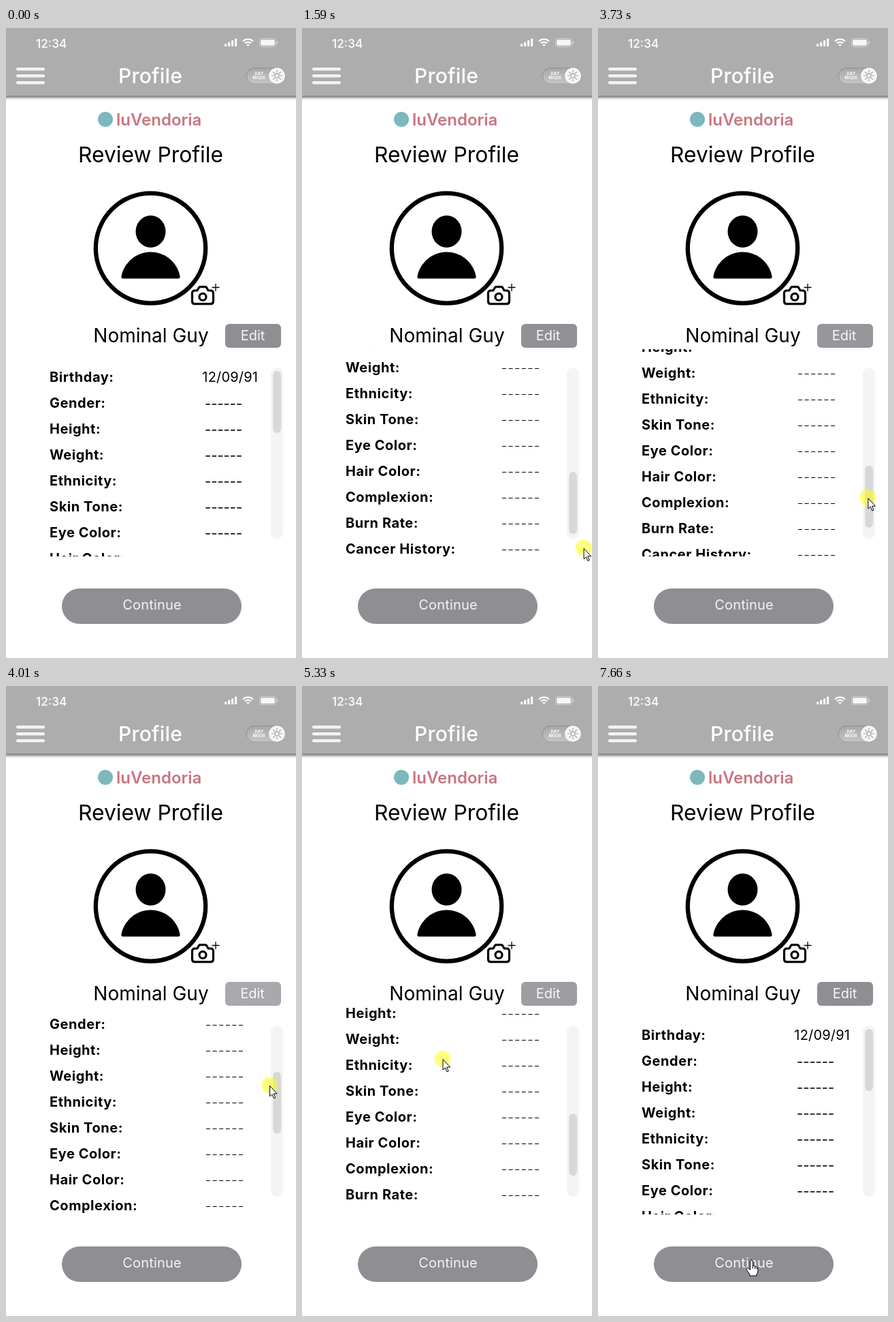
Write an HTML page with a canvas that moves like this. It is 426 px wide and 924 px high and loops after 7.73 s.

```html
<!DOCTYPE html>
<html lang="en">
<head>
<meta charset="utf-8">
<title>Profile review</title>
<style>
html, body { margin: 0; width: 100%; height: 100%; overflow: hidden; background: #fff; }
canvas { display: block; width: 426px; height: 924px; }
</style>
</head>
<body>
<canvas id="stage"></canvas>
<script>
const W = 426, H = 924, LOOP = 7730, TICK = 70;
const canvas = document.getElementById("stage");
const ratio = window.devicePixelRatio || 1;
canvas.width = W * ratio;
canvas.height = H * ratio;
const ctx = canvas.getContext("2d");

const LABELS = ["Birthday", "Gender", "Height", "Weight", "Ethnicity", "Skin Tone",
  "Eye Color", "Hair Color", "Complexion", "Burn Rate", "Cancer History"];
const ROW = 38, SCROLL = 131, THUMB_TRAVEL = 151;
const GRAY = "#8e8e93";

// Each move eases the pointer from where it rests to a new point
const HOME = { x: 440, y: 590 };
const MOVES = [
  { start: 280, end: 830, x: 400, y: 562 },
  { start: 960, end: 1660, x: 414, y: 768 },
  { start: 1660, end: 1870, x: 428, y: 788 },
  { start: 2070, end: 2490, x: 270, y: 735 },
  { start: 2490, end: 2840, x: 424, y: 684 },
  { start: 2910, end: 3450, x: 398, y: 706 },
  { start: 3590, end: 4360, x: 379, y: 496 },
  { start: 4360, end: 4780, x: 205, y: 696 },
  { start: 4910, end: 5500, x: 207, y: 512 },
  { start: 5870, end: 6475, x: 227, y: 748 },
  { start: 6820, end: 7590, x: 225.5, y: 842 }
];
// While held, the pointer's distance from the grab point scrolls the list
const DRAGS = [
  { start: 960, end: 1660, grab: 562, span: 205, base: 0 },
  { start: 3590, end: 4360, grab: 706, span: 205, base: 1 },
  { start: 4910, end: 6820, grab: 696, span: -181, base: 0 }
];
const PRESS_LEAD = 140;

const clamp = v => Math.max(0, Math.min(1, v));
const ease = k => 0.5 - 0.5 * Math.cos(Math.PI * k);
const lastStarted = (list, t) => list.findLast(item => item.start <= t);

function snap(t) {
  const move = lastStarted(MOVES, t);
  return move ? move.start + Math.floor((t - move.start) / TICK) * TICK : 0;
}

function pointerAt(t) {
  const move = lastStarted(MOVES, t);
  if (!move) return HOME;
  const from = MOVES[MOVES.indexOf(move) - 1] || HOME;
  const k = ease(clamp((t - move.start) / (move.end - move.start)));
  return { x: from.x + (move.x - from.x) * k, y: from.y + (move.y - from.y) * k };
}

function scrollAt(t) {
  const drag = lastStarted(DRAGS, t);
  if (!drag) return 0;
  // At the very end the next move begins from the same point
  const y = pointerAt(Math.min(t, drag.end)).y;
  return clamp(drag.base + (y - drag.grab) / drag.span);
}

const dragging = (t, lead = 0) => DRAGS.some(d => t >= d.start - lead && t < d.end);

function text(str, x, y, size, weight = 400, color = "#000", align = "left", spacing = 0) {
  ctx.font = `${weight} ${size}px Inter, sans-serif`;
  ctx.letterSpacing = spacing + "px";
  ctx.textAlign = align;
  ctx.fillStyle = color;
  ctx.fillText(str, x, y);
}

function pill(x, y, w, h, r, color) {
  ctx.fillStyle = color;
  ctx.beginPath();
  ctx.roundRect(x, y, w, h, r);
  ctx.fill();
}

function disc(x, y, r, color) {
  ctx.fillStyle = color;
  ctx.beginPath();
  ctx.arc(x, y, r, 0, Math.PI * 2);
  ctx.fill();
}

function ring(x, y, r, width, color) {
  ctx.strokeStyle = color;
  ctx.lineWidth = width;
  ctx.beginPath();
  ctx.arc(x, y, r, 0, Math.PI * 2);
  ctx.stroke();
}

function outline(d, width, color) {
  ctx.strokeStyle = color;
  ctx.lineWidth = width;
  ctx.stroke(new Path2D(d));
}

function drawStatus() {
  const ink = "#f7f7f7";
  text("12:34", 44, 29, 17, 600, ink);
  for (let i = 0; i < 4; i++) {
    const h = 4 + i * 2.5;
    pill(321 + i * 5, 27 - h, 3.2, h, 0.8, ink);
  }
  // Wi-Fi fan
  ctx.lineCap = "butt";
  ctx.strokeStyle = ink;
  ctx.lineWidth = 2.4;
  for (const r of [2, 6.4, 10.6]) {
    ctx.beginPath();
    ctx.arc(355.5, 27, r, -Math.PI * 0.75, -Math.PI * 0.25);
    ctx.stroke();
  }
  // Battery
  ctx.strokeStyle = "rgba(255,255,255,.45)";
  ctx.lineWidth = 1;
  ctx.beginPath();
  ctx.roundRect(372.5, 15.5, 24, 12, 3.5);
  ctx.stroke();
  pill(374.2, 17.2, 20.6, 8.6, 2, ink);
  pill(397.8, 19.5, 1.4, 4, 0.7, "rgba(255,255,255,.5)");
}

function drawToggle() {
  const shade = ctx.createLinearGradient(0, 58, 0, 82);
  shade.addColorStop(0, "#a6a6a6");
  shade.addColorStop(1, "#c6c6c6");
  pill(353, 58, 57, 24, 12, "#939393");
  pill(354, 59.2, 55.4, 22.4, 11.2, shade);
  text("DAY", 372, 69, 5.8, 700, "#fff", "center", 0.3);
  text("MODE", 372, 75, 5.8, 700, "#fff", "center", 0.3);
  disc(398, 70, 11.8, "#f6f6f6");
  ring(398, 70, 3.2, 1.2, "#9a9a9a");
  ctx.lineCap = "round";
  ctx.beginPath();
  for (let i = 0; i < 8; i++) {
    const c = Math.cos(i * Math.PI / 4), s = Math.sin(i * Math.PI / 4);
    ctx.moveTo(398 + c * 5.3, 70 + s * 5.3);
    ctx.lineTo(398 + c * 7.6, 70 + s * 7.6);
  }
  ctx.stroke();
}

function drawHeader() {
  ctx.save();
  ctx.shadowColor = "rgba(0,0,0,.6)";
  ctx.shadowBlur = 4 * ratio;
  ctx.shadowOffsetY = 2 * ratio;
  ctx.fillStyle = "#adadad";
  ctx.fillRect(-10, -10, W + 20, 109.5);
  ctx.restore();
  drawStatus();
  for (let i = 0; i < 3; i++) pill(15, 58 + i * 10, 42, 4.6, 2.3, "#f3f3f3");
  text("Profile", 212, 81, 30, 500, "#fff", "center", 0.2);
  drawToggle();
}

function drawBrand() {
  disc(146, 134, 11, "#7cb8bd");
  text("luVendoria", 162, 143, 24, 600, "#c9757f");
}

function drawAvatar() {
  ring(212.5, 323, 80.7, 6.3, "#000");
  ctx.fillStyle = "#000";
  ctx.beginPath();
  ctx.ellipse(212.5, 298.5, 22, 23.5, 0, 0, Math.PI * 2);
  ctx.fill();
  // Shoulders: a circle cut flat, with softened corners
  ctx.beginPath();
  ctx.arc(212.5, 372.3, 43.8, Math.PI * 1.06, -Math.PI * 0.06);
  ctx.quadraticCurveTo(256.3, 367.5, 253, 367.5);
  ctx.lineTo(172, 367.5);
  ctx.quadraticCurveTo(168.7, 367.5, 169.5, 364);
  ctx.fill();
  // Camera with plus
  ctx.lineCap = "round";
  ctx.lineJoin = "round";
  outline("M277.5 385H281L283.3 380.8Q284 379.7 285.3 379.7H292.7Q294 379.7 294.7 380.8L297 385H300.5" +
    "Q304.5 385 304.5 389V400.7Q304.5 404.7 300.5 404.7H277.5Q273.5 404.7 273.5 400.7V389" +
    "Q273.5 385 277.5 385Z", 3.2, "#000");
  ring(289, 394.4, 5, 3.2, "#000");
  ctx.lineCap = "butt";
  outline("M302.5 380.5H313.5M308 375V386", 1.3, "#000");
}

function drawList(p, thin) {
  ctx.save();
  ctx.beginPath();
  ctx.rect(57, 471, 330, 304);
  ctx.clip();
  LABELS.forEach((label, i) => {
    const y = Math.round(512 + i * ROW - p * SCROLL);
    text(label + ":", 64, y + 7, 20, 750, "#000", "left", 0.55);
    if (i === 0) {
      text("12/09/91", 288.3 - p * 4, y + 7, 20, 400, "#000", "left", 0.2);
    } else if (thin) {
      for (let d = 0; d < 6; d++) ctx.fillRect(294 + d * 9.6, y + 1, 6, 1);
    } else {
      text("------", 292, y + 7.5, 20);
    }
  });
  ctx.restore();
  pill(389, 498, 18, 251, 9, "#f4f4f4");
  pill(392.3, 503 + p * THUMB_TRAVEL, 11.7, 91, 5.8, "#d8d8d8");
}

function drawEdit(p) {
  // The two scroll states cross-fade, which thins the fill midway
  ctx.globalAlpha = 1 - p * (1 - p);
  pill(322, 434, 82, 35, 6, GRAY);
  ctx.globalAlpha = 1;
  text("Edit", 362.5 - p, 458, 20, 400, "#f7f7f7", "center");
}

function drawShape(x, y, d) {
  ctx.save();
  ctx.translate(x, y);
  ctx.lineJoin = "round";
  ctx.fillStyle = "#fff";
  ctx.fill(new Path2D(d));
  outline(d, 1, "#000");
  ctx.restore();
}

function drawPointer({ x, y }, pressed) {
  if (pressed) disc(x, y - 0.5, 12, "rgba(255,255,0,.5)");
  if (y > 822) {
    drawShape(x, y, "M-2 2A2 2 0 0 1 2 2V8.5Q4 7.2 5 9.4Q7 8.6 7.6 10.6Q9.4 10.4 9.4 12.6V16" +
      "Q9.4 19 7.4 21V23H-2.6V21L-6.8 14.8Q-7.8 12.2 -6 11.6Q-4.4 11.4 -2 14.4Z" +
      "M2 8.5V12.5M5 9.4V13M7.6 10.6V13.4");
  } else {
    drawShape(x, y, "M.4 .4V15.8L3.8 12.8L6.3 18.7L8.6 17.7L6.1 11.9H11Z");
  }
}

function draw(now) {
  const t = snap(now % LOOP);
  const p = scrollAt(t);
  ctx.setTransform(ratio, 0, 0, ratio, 0, 0);
  ctx.fillStyle = "#fff";
  ctx.fillRect(0, 0, W, H);
  drawHeader();
  drawBrand();
  text("Review Profile", 212.5, 197, 31.8, 400, "#000", "center");
  drawAvatar();
  drawList(p, p > 0 || dragging(t));
  text("Nominal Guy", 213, 461, 28, 400, "#000", "center");
  drawEdit(p);
  pill(82, 822, 264, 52, 26, GRAY);
  text("Continue", 214.5, 853, 20, 400, "#f4f4f4", "center", 0.2);
  drawPointer(pointerAt(t), dragging(t, PRESS_LEAD));
}

const begin = performance.now();
function loop() {
  draw(performance.now() - begin);
  requestAnimationFrame(loop);
}
loop();
</script>
</body>
</html>
```
